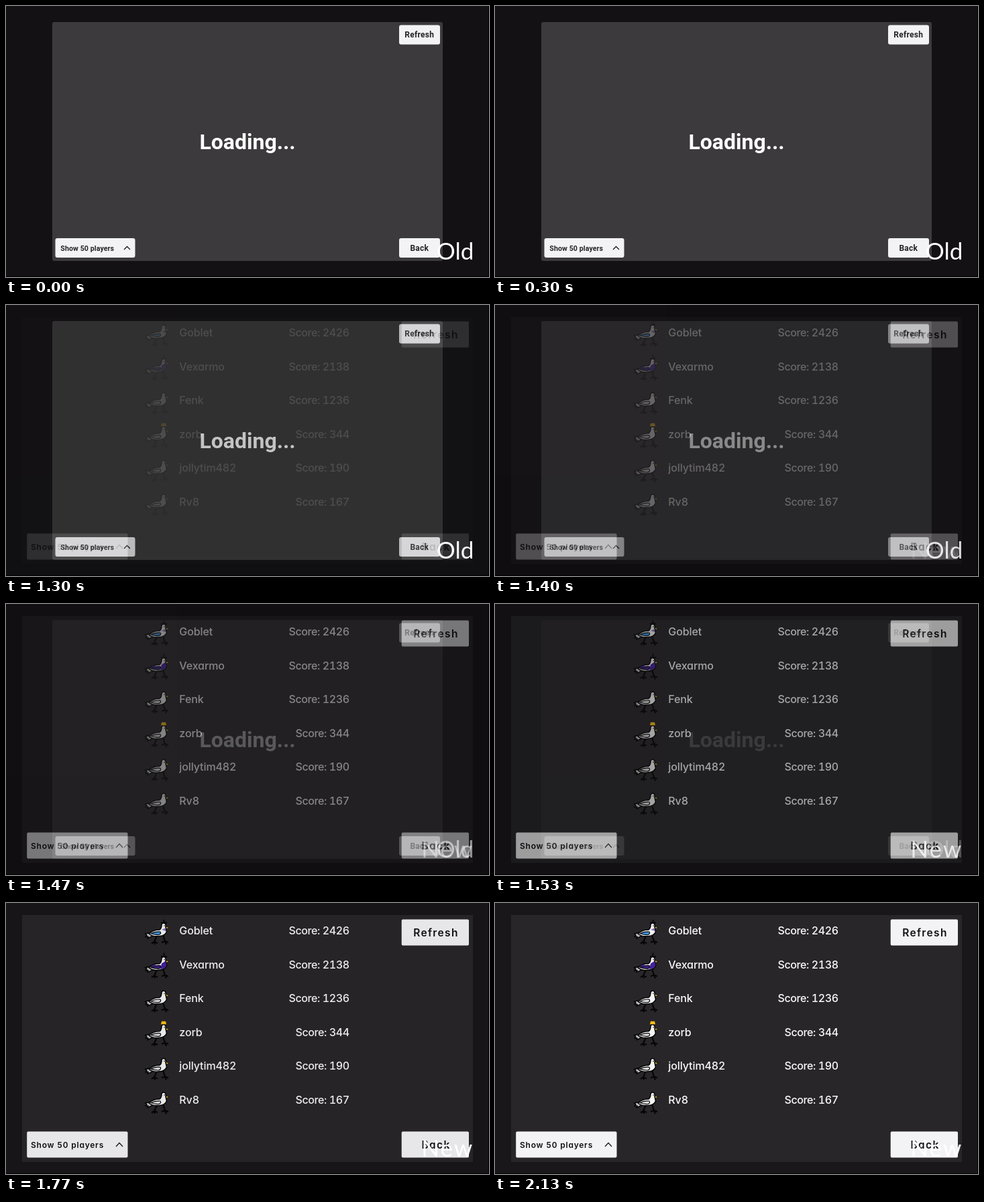
Write an HTML page that moves like this. It is 720x405 px and loops after 3000 ms.

```html
<!DOCTYPE html>
<html lang="en">
<head>
<meta charset="utf-8">
<title>Leaderboard: old and new</title>
<style>
  html, body { margin: 0; width: 100%; height: 100%; overflow: hidden; background: #000; }
  svg { display: block; width: 100%; height: 100%; }
  .button { fill: #f3f2f5; }
  .chevron { fill: none; stroke: #1b1a1d; stroke-width: 1.3; }
  .mid { text-anchor: middle; }
  .end { text-anchor: end; }
  #old text { font-family: Roboto, sans-serif; font-weight: 600; font-size: 12px; letter-spacing: .25px; fill: #252428; }
  #old .small { font-size: 10.6px; letter-spacing: .1px; }
  #old .loading { font-weight: 700; font-size: 32px; letter-spacing: 0; fill: #fff; }
  #new text { font-family: Inter, sans-serif; font-feature-settings: "cv11", "tnum"; font-weight: 600; font-size: 15.5px; letter-spacing: 1.35px; fill: #111; }
  #new .small { font-size: 12px; letter-spacing: .75px; }
  #new .row { font-weight: 500; font-size: 16px; letter-spacing: -.1px; fill: #fafafa; }
  #new .score { letter-spacing: -.4px; }
  .label { font-family: Lato, sans-serif; font-size: 35px; fill: #fff; }
  #newLabel { letter-spacing: 2px; }
</style>
</head>
<body>
<svg viewBox="0 0 720 405">
  <defs>
    <clipPath id="list"><rect x="24" y="25" width="672" height="362"/></clipPath>
    <g id="legs" fill="none" stroke="#050505" stroke-width="2.1">
      <path d="M225 8 L221 17 M217 19.500 L221 17 L226 19 M221 17 L222 21"/>
      <path d="M234 7 L237 16 M232 18 L237 16 L242 18 M237 16 L239 21"/>
    </g>
    <g id="body" stroke="#050505" stroke-width="1.6" stroke-linejoin="round">
      <path d="M217 3 L207.500 5 L210 7 L208 9.500 L212 9 L211 12 L219 8 Z" fill="#c5c5c8"/>
      <path d="M238 -6 L243 -4 L238 -2 Z" fill="#f0c420" stroke-width=".6"/>
      <path d="M213 5 Q219 -1 229 -1 Q232 -3 232 -9 Q233 -11.500 235.500 -11 Q239 -10 238 -5 L239.500 2 Q237 8 229 8.500 Q219 10 213 5 Z" fill="#f5f5f6"/>
    </g>
    <path id="wing" d="M216 4.500 Q223 1 230 2 Q232 5 228 6.500 Q222 7 216 4.500 Z" stroke="#050505" stroke-width="1.2"/>
  </defs>

  <g id="old">
    <rect width="719" height="404" fill="#131114"/>
    <rect x="69" y="24" width="582" height="357" rx="3" fill="#3c3a3c"/>
    <text class="loading mid" x="360" y="213.5">Loading...</text>
    <rect class="button" x="586" y="28.5" width="61" height="29" rx="3"/>
    <text class="mid" x="616.3" y="47.3">Refresh</text>
    <rect class="button" x="586" y="347" width="61" height="29" rx="3"/>
    <text class="mid" x="616.3" y="366">Back</text>
    <rect class="button" x="73.5" y="347" width="119" height="29" rx="3"/>
    <text class="small" x="81.3" y="365.8">Show 50 players</text>
    <path class="chevron" d="M176 364 L180.5 359.5 L185 364"/>
  </g>

  <g id="new">
    <rect width="719" height="404" fill="#19171a"/>
    <rect x="24" y="18" width="672" height="369" fill="#282629"/>
    <g id="rows" clip-path="url(#list)"></g>
    <rect class="button" x="589.7" y="24.5" width="100.3" height="39" rx="2"/>
    <text class="mid" x="641" y="50">Refresh</text>
    <rect class="button" x="589.7" y="341.5" width="100.3" height="39" rx="2"/>
    <text class="mid" x="641" y="367">Back</text>
    <rect class="button" x="31.2" y="341.5" width="150.3" height="39" rx="2"/>
    <text class="small" x="37" y="366">Show 50 players</text>
    <path class="chevron" d="M164 364 L169 358.5 L174 364"/>
  </g>

  <text id="newLabel" class="label end" x="697.3" y="379">New</text>
  <text id="oldLabel" class="label end" x="697.3" y="379">Old</text>
</svg>
<script>
  const LOOP = 3000;
  const SCREEN_FADE = [980, 1980], LABEL_FADE = [1230, 1730];
  const ROW_PITCH = 50.6;

  const cap = '<path d="M231 -11.500 L232 -16 H238 L239 -11.500 Z" fill="#f5bf18"/>';
  const topHat = '<path d="M231 -11.500 H240 M235.500 -17 V-12" stroke="#08070a" stroke-width="2"/>';
  const patches =
    '<path d="M232 -1 L238 -5 L239 2 Q236 8 230 7 Z M215 4 L221 0 L224 2 Z" fill="#4420a0"/>';
  const trim = '<path d="M232 -1 L238 -4 V1 Z" fill="#8d79c2"/>';

  const players = [
    { name: 'Goblet', score: 2426, wing: '#3d91da', extra: trim + topHat },
    { name: 'Vexarmo', score: 2138, wing: '#3b2384', extra: patches + topHat },
    { name: 'Fenk', score: 1236 },
    { name: 'zorb', score: 344, extra: cap },
    { name: 'jollytim482', score: 190 },
    { name: 'Rv8', score: 167 },
  ];

  document.getElementById('rows').innerHTML = players.map(
    ({ name, score, wing = '#dededf', extra = '' }, i) => `
    <g transform="translate(0 ${41 + i * ROW_PITCH})">
      <use href="#legs"/><use href="#body"/>
      <use href="#wing" fill="${wing}"/>${extra}
      <circle cx="236" cy="-7" r=".8" fill="#111"/>
      <text class="row" x="258.300" y="6">${name}</text>
      <text class="row score end" x="511.700" y="6">Score: ${score}</text>
    </g>`).join('');

  function fade(id, from, to, [start, end]) {
    document.getElementById(id).animate([
      { opacity: from, offset: 0 },
      { opacity: from, offset: start / LOOP, easing: 'cubic-bezier(.65, 0, .35, 1)' },
      { opacity: to, offset: end / LOOP },
      { opacity: to, offset: 1 },
    ], { duration: LOOP, iterations: Infinity });
  }

  // Both screens fade over black, so the picture dips in the middle.
  fade('old', 1, 0, SCREEN_FADE);
  fade('new', 0, 1, SCREEN_FADE);
  fade('oldLabel', 1, 0, LABEL_FADE);
  fade('newLabel', 0, 1, LABEL_FADE);
</script>
</body>
</html>
```
